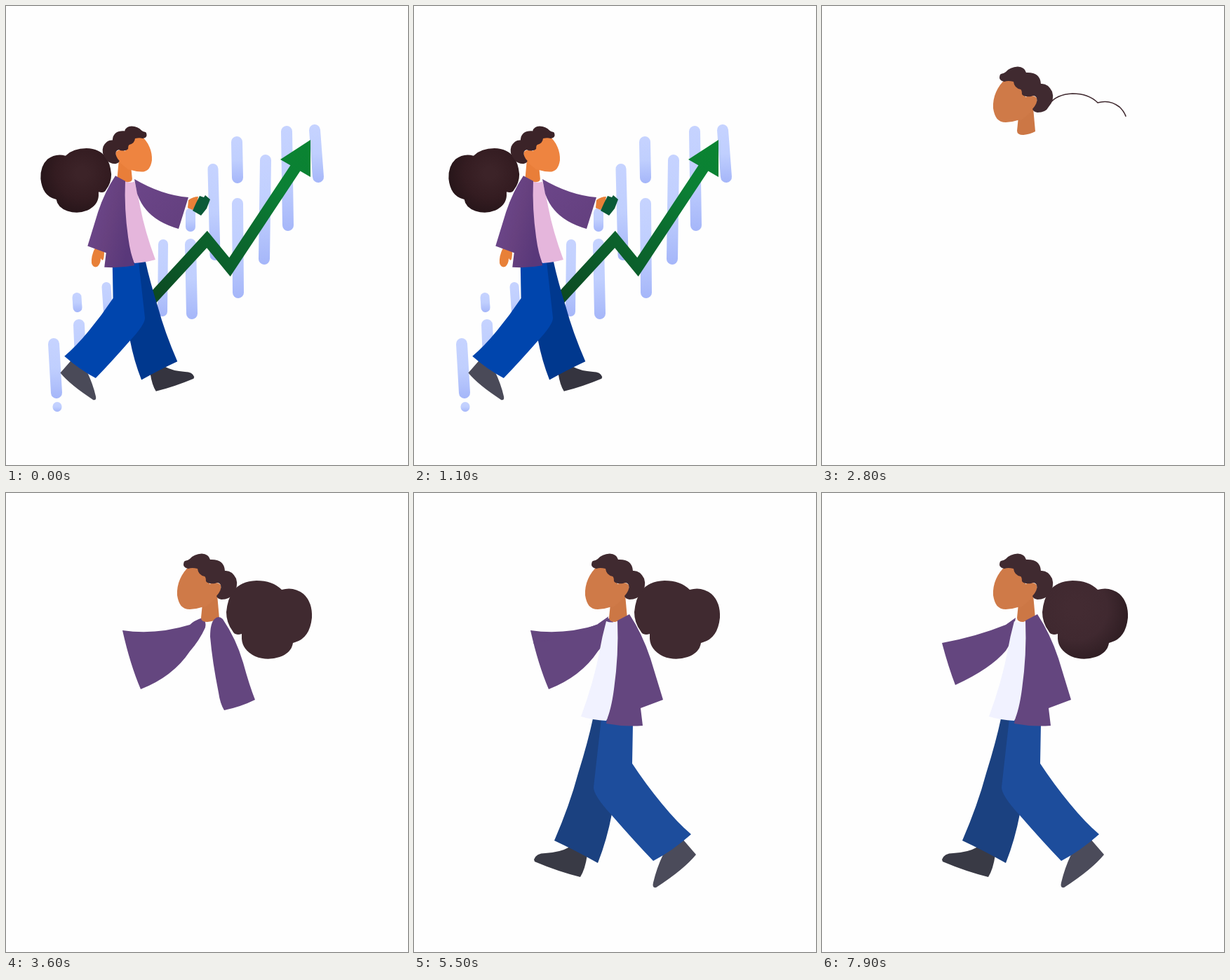
Animation, 573 px wide and 655 px high, one loop 8000 ms. Source, as an HTML page with a canvas:

```html
<!DOCTYPE html>
<html lang="en">
<head>
<meta charset="utf-8">
<title>Walking figure</title>
<style>
html, body { margin: 0; width: 100%; height: 100%; overflow: hidden; background: #fefefe; }
canvas { display: block; width: 573px; height: 655px; }
</style>
</head>
<body>
<canvas id="stage" width="573" height="655"></canvas>
<script>
const ctx = document.getElementById('stage').getContext('2d');
const LOOP = 8000;

function shape(d) {
  const el = document.createElementNS('http://www.w3.org/2000/svg', 'path');
  el.setAttribute('d', d);
  return { path: new Path2D(d), len: el.getTotalLength() };
}

const S = {
  face: shape('M262 104C250 114 243 130 244 146C246 159 251 166 262 166Q270 166 279 163L285 162L302 148Q308 139 306 131Q299 125 290 130L284 108Z'),
  neck: shape('M280 158L278 178Q278 184 287 184Q297 183 304 179L301 145Z'),
  hair: shape('M255 97Q260 96 262 94Q268 87 279 86.5Q289 87 291 95Q311 94 312 111Q322 110 328 122Q332 134 323 144Q319 152 307 152Q301 151 300 147Q308 138 306 131Q303 126 298 129Q288 130 285 126Q285 120 283 119Q274 117 273 108Q265 106 260 108Q254 107 253 103Q253 98 255 97Z'),
  tail: shape('M324 140Q334 126 357 125Q380 125 393 138Q410 133 424 144Q437 156 436 178Q433 207 412 213L409 214Q407 228 390 234Q372 240 355 233Q337 224 336 208L336 201Q326 204 323 197Q314 185 314 170Q316 150 324 140Z'),
  wideArm: shape('M166 196Q213 203 262 188Q268 182 280 178Q286 183 284 192Q276 210 262 226Q238 262 192 280Q177 245 166 196Z'),
  slimArm: shape('M171 214Q220 205 262 188L276 178L270 212L262 225Q240 251 190 274Q180 248 171 214Z'),
  backArm: shape('M297 180Q303 174 309 180Q328 208 338 242Q347 275 355 295Q335 305 311 310Q305 300 303 285Q294 240 291 205Q291 186 297 180Z'),
  coat: shape('M290 182L307 173Q325 200 337 236L355 295L323 307L326 332Q300 334 274 329Q284 275 287 240Q290 210 290 182Z'),
  shirt: shape('M274 183Q282 186 290 183Q292 230 285 280Q281 310 274 325Q255 324 238 319Q256 270 264 228Q268 205 274 183Z'),
  farLeg: shape('M255 322L270 324L264 400L282 458Q275 495 262 528Q230 510 200 496Q222 445 234 400Q248 355 255 322Z'),
  nearLeg: shape('M267 322L312 330L311 386Q330 415 353 443Q375 470 395 487Q368 511 341 525Q315 498 282 460Q256 432 256 420Q261 375 267 322Z'),
  farShoe: shape('M171 523Q174 514 187 514Q208 513 222 505L247 516Q244 537 237 548Q205 540 172 526Z'),
  nearShoe: shape('M355 516Q372 502 383 494L402 516Q385 537 345 563Q339 564 341 556Q346 535 355 516Z')
};

const frontArm = new Path2D('M183 247Q222 270 260 273L246 318Q215 309 200 291Q192 282 187 268Z');
const frontHand = new Path2D('M260 277Q267 272 274 272L272 283L266 291L259 288Z');
const purse = new Path2D('M266 292L271 281L276 271L282 273L284 270L291 276L286 289L278 299Z');
const backHand = new Path2D('M127 345Q121 357 122 367Q124 374 130 372Q135 368 135 360Q140 369 140 349Z');

// top x, top y, bottom x, bottom y, width
const bars = [
  [68, 474, 72, 560, 16], [73, 565, 73, 579, 13], [101, 409, 102, 437, 13],
  [104, 447, 106, 510, 16], [143, 394, 146, 450, 13], [224, 333, 223, 443, 14],
  [263, 332, 265, 447, 16], [263, 288, 263, 322, 14], [295, 225, 298, 363, 15],
  [329, 186, 330, 253, 16], [330, 274, 331, 417, 16], [370, 212, 368, 369, 16],
  [400, 171, 402, 321, 16], [440, 169, 445, 252, 16]
];

function blend(g, ...colors) {
  colors.forEach((c, i) => g.addColorStop(i / (colors.length - 1), c));
  return g;
}
const linear = (x1, y1, x2, y2, ...c) => blend(ctx.createLinearGradient(x1, y1, x2, y2), ...c);
const radial = (x, y, r0, r1, ...c) => blend(ctx.createRadialGradient(x, y, r0, x, y, r1), ...c);

function fill(path, color) {
  ctx.fillStyle = color;
  ctx.fill(path);
}

function line(d, color, width) {
  ctx.strokeStyle = color;
  ctx.lineWidth = width;
  ctx.lineCap = 'round';
  ctx.stroke(new Path2D(d));
}

const arrowInk = linear(214, 415, 434, 191, '#0c4a22', '#0b5c2a', '#0b6a2e', '#0b8035', '#0a8431');
const softHair = radial(362, 165, 10, 80, '#432b32', '#402930', '#2d1c21');

function drawChart() {
  ctx.lineCap = 'round';
  for (const [x1, y1, x2, y2, w] of bars) {
    ctx.strokeStyle = linear(0, y1, 0, y2, '#c6d3ff', '#c0cffe', '#a5b6f9');
    ctx.lineWidth = w;
    ctx.beginPath();
    ctx.moveTo(x1, y1 + w / 2);
    ctx.lineTo(x2, Math.max(y1 + w / 2 + 0.1, y2 - w / 2));
    ctx.stroke();
  }
  ctx.lineCap = 'butt';
  ctx.lineJoin = 'miter';
  ctx.strokeStyle = arrowInk;
  ctx.lineWidth = 16;
  ctx.stroke(new Path2D('M199 428L286.5 333L319 372.5L414 229'));
  fill(new Path2D('M434 191L391 219L434 244Z'), arrowInk);
}

function drawPoster() {
  drawChart();
  fill(backHand, '#e88038');
  ctx.save();
  ctx.transform(-0.826, 0, 0, 0.82, 409.5, 100.5);
  const layers = [
    ['tail', radial(365, 168, 10, 78, '#3c2328', '#341c21', '#241418')],
    ['neck', '#e97e39'], ['face', '#ee8440'], ['hair', '#3b2328'],
    ['farShoe', '#35343f'], ['nearShoe', '#4a4a58'],
    ['farLeg', '#00388e'], ['nearLeg', '#0045ad'],
    ['coat', linear(355, 240, 275, 260, '#6c478c', '#67417f', '#59387a')],
    ['shirt', '#e5b6dc']
  ];
  for (const [name, color] of layers) fill(S[name].path, color);
  ctx.restore();
  fill(frontHand, '#e88038');
  fill(frontArm, linear(190, 255, 250, 310, '#6b4588', '#64407f'));
  fill(purse, '#0a5a38');
}

// name, colour, outline start, fill time, end; listed back to front
const build = [
  ['tail', '#402a30', 2800, 3100, 6300],
  ['tail', softHair, 6300, 6300, LOOP],
  ['farShoe', '#393a45', 4700, 4900, LOOP],
  ['nearShoe', '#4b4b5a', 5000, 5200, LOOP],
  ['farLeg', '#1b4180', 4000, 4200, LOOP],
  ['nearLeg', '#1d4d9c', 4200, 4400, LOOP],
  ['wideArm', '#64467f', 3100, 3300, 5700],
  ['slimArm', '#64467f', 5500, 5700, LOOP],
  ['neck', '#cc7745', 2100, 2300, LOOP],
  ['face', '#cf7a48', 1900, 2100, LOOP],
  ['hair', '#402a30', 2300, 2700, LOOP],
  ['backArm', '#64467f', 3300, 3500, 3900],
  ['coat', '#64467f', 3800, 3900, LOOP],
  ['shirt', '#f1f2ff', 3700, 3800, LOOP]
];

function drawSketch() {
  line('M260 106Q244 122 244 144Q248 166 263 166Q278 165 291 145', '#a8683f', 1.2);
  line('M254 114Q246 126 246 144Q249 161 262 166Q278 165 291 157', '#d28a60', 1.2);
  line('M291 131Q297 125 304 129Q308 137 298 147', '#a8683f', 1.2);
}

function drawTouchUp() {
  line('M331 207Q342 239 384 238', '#fefefe', 3.5);
  line('M333 217Q348 242 382 240', '#3b2a34', 2);
  line('M302 153L319 148M309 174L314 160', '#a79cac', 1.5);
  line('M305 158L314 153', '#fefefe', 2);
}

function drawBuild(t) {
  for (const [name, color, start, full, end] of build) {
    if (t < start || t >= end) continue;
    const { path, len } = S[name];
    if (t >= full) {
      fill(path, color);
      continue;
    }
    ctx.setLineDash([len * (t - start + 100) / (full - start), len]);
    ctx.strokeStyle = color;
    ctx.lineWidth = 1.6;
    ctx.stroke(path);
    ctx.setLineDash([]);
  }
  if (t >= 6500 && t < 6800) drawTouchUp();
}

const origin = performance.now();

function frame(now) {
  const t = Math.floor(Math.max(0, now - origin) % LOOP / 100) * 100;
  ctx.fillStyle = '#fefefe';
  ctx.fillRect(0, 0, 573, 655);
  if (t < 1300) drawPoster();
  else if (t >= 1900) drawBuild(t);
  else if (t >= 1800) drawSketch();
  requestAnimationFrame(frame);
}
requestAnimationFrame(frame);
</script>
</body>
</html>
```
